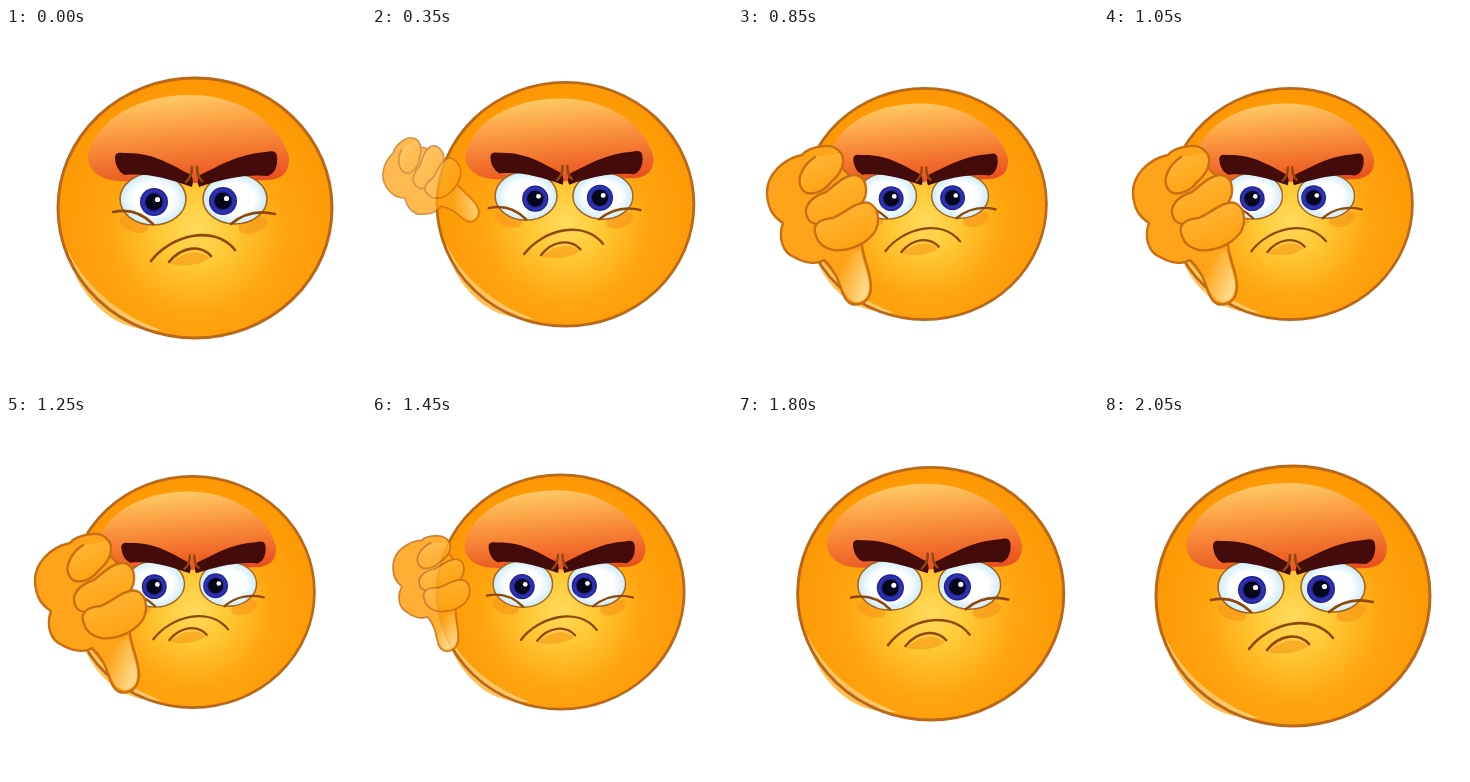
An HTML page that plays this animation: 360 by 360 pixels, repeating every 2350 ms.

```html
<!DOCTYPE html>
<html lang="en">
<head>
<meta charset="utf-8">
<title>Thumbs down</title>
<style>
html, body { margin: 0; width: 100%; height: 100%; overflow: hidden; background: #fff; }
svg { display: block; width: 100%; height: 100%; }
.line { fill: none; stroke: #8f480b; stroke-width: 2.6; stroke-linecap: round; }
.skin { stroke: #c96f12; stroke-width: 2.4; stroke-linejoin: round; stroke-linecap: round; }
.white { fill: url(#white); stroke: #a5641c; stroke-width: 1.6; }
</style>
</head>
<body>
<svg viewBox="0 0 360 360">
  <defs>
    <radialGradient id="ball" gradientUnits="userSpaceOnUse" cx="190" cy="200" r="145">
      <stop offset="0" stop-color="#ffdb5c"/>
      <stop offset=".25" stop-color="#ffc936"/>
      <stop offset=".6" stop-color="#ffa510"/>
      <stop offset="1" stop-color="#fd9804"/>
    </radialGradient>
    <linearGradient id="anger" x1=".4" y1="0" x2=".6" y2="1">
      <stop offset="0" stop-color="#ffca66"/>
      <stop offset=".3" stop-color="#fda648"/>
      <stop offset=".65" stop-color="#f47a31"/>
      <stop offset="1" stop-color="#e9501f"/>
    </linearGradient>
    <linearGradient id="shine" x1=".1" y1=".9" x2=".6" y2=".45">
      <stop offset=".2" stop-color="#ffb842"/>
      <stop offset="1" stop-color="#ffcf78"/>
    </linearGradient>
    <radialGradient id="white" cx=".5" cy=".5" r=".55">
      <stop offset=".55" stop-color="#fff"/>
      <stop offset="1" stop-color="#bfe6f6"/>
    </radialGradient>
    <radialGradient id="iris">
      <stop offset=".5" stop-color="#1a1a78"/>
      <stop offset=".8" stop-color="#3035b8"/>
      <stop offset="1" stop-color="#1d1d8c"/>
    </radialGradient>
    <linearGradient id="finger" x1=".2" y1="0" x2=".7" y2="1">
      <stop offset="0" stop-color="#ffb93a"/>
      <stop offset="1" stop-color="#ff9f0e"/>
    </linearGradient>
    <linearGradient id="thumb" x1="0" y1="0" x2="1" y2=".6">
      <stop offset=".3" stop-color="#ffa316"/>
      <stop offset="1" stop-color="#ffd987"/>
    </linearGradient>
    <g id="eyeball">
      <circle r="14" fill="url(#iris)"/>
      <circle r="8.5" fill="#07071c"/>
      <circle cx="3.5" cy="-2.5" r="2.6" fill="#fff"/>
    </g>
    <clipPath id="leftClip"><ellipse cx="147" cy="171" rx="33" ry="26"/></clipPath>
    <clipPath id="rightClip"><ellipse cx="229" cy="171" rx="32" ry="25"/></clipPath>
  </defs>

  <g id="face">
    <ellipse cx="189" cy="180" rx="137" ry="130" fill="url(#ball)"/>
    <path d="M62 222C76 255 112 287 155 302C135 303 117 298 103 288C80 271 66 248 62 222Z" fill="url(#shine)"/>
    <ellipse cx="189" cy="180" rx="137" ry="130" fill="none" stroke="#b9681a" stroke-width="3"/>
    <path d="M82 128C90 91 132 67 185 67C235 67 275 96 283 130C283 146 275 150 264 152L190 155L112 153C95 152 82 143 82 128Z" fill="url(#anger)"/>
    <ellipse cx="128" cy="196" rx="15" ry="8" fill="#f79417" opacity=".6" transform="rotate(18 128 196)"/>
    <ellipse cx="247" cy="197" rx="15" ry="8" fill="#f79417" opacity=".6" transform="rotate(-18 247 197)"/>
    <ellipse class="white" cx="147" cy="171" rx="33" ry="26"/>
    <ellipse class="white" cx="229" cy="171" rx="32" ry="25"/>
    <g clip-path="url(#leftClip)"><use id="leftEye" href="#eyeball"/></g>
    <g clip-path="url(#rightClip)"><use id="rightEye" href="#eyeball"/></g>
    <path class="line" d="M107 184Q130 179 147 196M269 186Q244 180 225 196"/>
    <g fill="#430b09">
      <path d="M109 129C110 123 115 125 121 125C148 125 166 137 185 147Q188 152 186 159C160 150 142 145 119 147C112 144 109 136 109 129Z"/>
      <path d="M271 128C270 122 265 123 260 124C232 126 213 138 194 147Q190 153 193 159C220 150 240 146 262 148C270 145 272 136 271 128Z"/>
    </g>
    <path class="line" d="M186 139Q186 149 180 154M191 139Q191 149 196 153"/>
    <path d="M163 236Q187 216 204 230Q188 241 163 236Z" fill="#f79a17" opacity=".6"/>
    <path class="line" d="M145 233C165 207 208 196 229 222M163 234C175 219 194 216 205 228"/>
  </g>

  <g id="hand">
    <path class="skin" fill="#ffa41a" d="M64 131C45 135 28 151 29 170C30 186 36 193 45 199C40 213 44 228 56 233C66 239 78 241 86 236C97 246 100 256 104 267C108 279 114 282 121 280C131 278 135 268 132 254C130 242 126 236 124 222L120 160L104 144C107 130 100 121 86 122C76 123 68 126 64 131Z"/>
    <path fill="url(#thumb)" d="M96 240C103 258 106 276 119 278C129 277 133 268 130 254L122 226Z"/>
    <path class="skin" fill="url(#finger)" d="M77 133C66 140 57 155 64 165C70 174 86 168 93 158C104 149 108 137 103 129"/>
    <path class="skin" fill="url(#finger)" d="M70 195C63 182 75 172 88 168C98 160 108 150 118 151C131 154 130 172 123 180C112 192 100 199 88 200C80 201 73 200 70 195Z"/>
    <path class="skin" fill="url(#finger)" d="M78 212C73 200 82 195 95 194C108 188 120 176 131 179C142 184 142 200 136 209C126 222 108 228 95 226C86 224 80 219 78 212Z"/>
  </g>
</svg>
<script>
const LOOP = 2350, STEP = 50, LAST = 2050;
const FIST = { x: 85, y: 185, scale: 1, angle: 0 };
const ENTRY = { x: 46, y: 143, scale: .61, angle: -35 };
const EXIT = { x: 51, y: 159, scale: .62, angle: 10 };

const [face, leftEye, rightEye, hand] =
  ["face", "leftEye", "rightEye", "hand"].map(id => document.getElementById(id));

const ramp = (t, from, to) => Math.min(1, Math.max(0, (t - from) / (to - from)));
const smooth = (t, from, to) => {
  const k = ramp(t, from, to);
  return k * k * (3 - 2 * k);
};
const mix = (a, b, k) => a + (b - a) * k;

function place(node, x, y, scale = 1, angle = 0, pivotX = 0, pivotY = 0) {
  node.setAttribute("transform",
    `translate(${x} ${y}) rotate(${angle}) scale(${scale}) translate(${-pivotX} ${-pivotY})`);
}

// The head sways right while it shrinks back, and again on its return.
function drawFace(t) {
  const back = smooth(t, 50, 600) - smooth(t, 1300, 2050);
  const x = 189 - 2.5 * back + 6 * Math.sin(Math.PI * back);
  const y = 176 + 4 * (1 - back) ** 3;
  place(face, x, y, 1 - .11 * back, 0, 189, 180);

  const gaze = back * mix(15.5, -2, smooth(t, 600, 1000));
  place(leftEye, 148 + gaze, 174);
  place(rightEye, 217 + gaze, 173);
}

function drawHand(t) {
  const shown = ramp(t, 200, 600) - ramp(t, 1250, 1650);
  const rest = t < 900 ? ENTRY : EXIT;
  const reach = shown * shown;
  const pose = key => mix(rest[key], FIST[key], reach);
  const lift = 4 * reach * smooth(t, 600, 850);
  place(hand, pose("x"), pose("y") - lift, pose("scale"), pose("angle"), FIST.x, FIST.y);
  hand.setAttribute("opacity", Math.min(1, 1.25 * Math.sqrt(shown)));
}

const start = performance.now();
function tick() {
  const elapsed = (performance.now() - start) % LOOP;
  const t = Math.min(LAST, Math.floor(elapsed / STEP) * STEP);
  drawFace(t);
  drawHand(t);
  requestAnimationFrame(tick);
}
tick();
</script>
</body>
</html>
```
